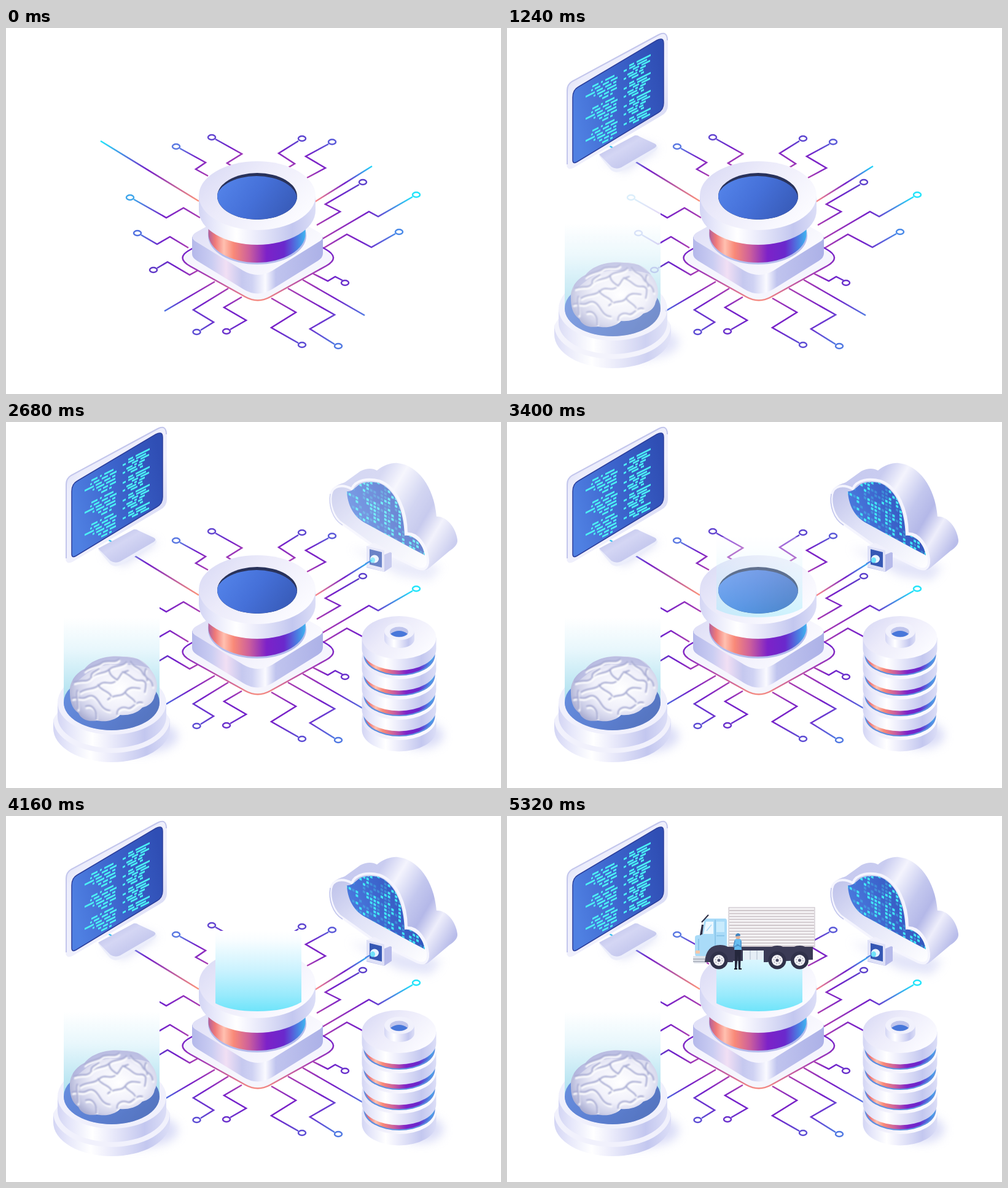
Write an HTML page that moves like this. It is 806 by 596 pixels and loops after 10000 ms.

```html
<!DOCTYPE html>
<html lang="en">
<head>
<meta charset="utf-8">
<title>Data hub</title>
<style>
html, body { margin: 0; width: 100%; height: 100%; overflow: hidden; background: #fff; }
svg { display: block; width: 806px; height: 596px; }
.layer { animation: 10s linear infinite both; }
#monitor { animation-name: monitor; }
#brain { animation-name: brain; }
#store { animation-name: store; }
#cloud { animation-name: cloud; }
#beam { animation-name: beam; }
#truck { animation-name: truck; }
@keyframes monitor { 0% { opacity: 0 } 7.2%, 100% { opacity: 1 } }
@keyframes brain { 0%, 7.2% { opacity: 0 } 13.6%, 100% { opacity: 1 } }
@keyframes store { 0%, 14% { opacity: 0 } 20%, 100% { opacity: 1 } }
@keyframes cloud { 0%, 22.4% { opacity: 0 } 28.4%, 100% { opacity: 1 } }
@keyframes beam { 0%, 30.4% { opacity: 0 } 41.6%, 100% { opacity: 1 } }
@keyframes truck { 0%, 46.8% { opacity: 0 } 53.2%, 100% { opacity: 1 } }
</style>
</head>
<body>
<svg viewBox="0 0 806 596">
<defs>
  <linearGradient id="side">
    <stop offset="0" stop-color="#d3d5f4"/><stop offset=".12" stop-color="#e6e7fa"/>
    <stop offset=".32" stop-color="#fff"/><stop offset=".45" stop-color="#f0f0fc"/>
    <stop offset=".8" stop-color="#c3c7ef"/><stop offset="1" stop-color="#dcdef7"/>
  </linearGradient>
  <linearGradient id="top" x1="0" y1="0" x2="1" y2=".6">
    <stop offset="0" stop-color="#d6d7f4"/><stop offset=".45" stop-color="#ecebfa"/><stop offset="1" stop-color="#fbfbff"/>
  </linearGradient>
  <linearGradient id="glow">
    <stop offset="0" stop-color="#b0609c"/><stop offset=".07" stop-color="#f07a78"/>
    <stop offset=".16" stop-color="#ffc0b0"/><stop offset=".26" stop-color="#f98a78"/>
    <stop offset=".42" stop-color="#cc5f9c"/><stop offset=".6" stop-color="#7d22c8"/>
    <stop offset=".78" stop-color="#6a28cc"/><stop offset=".92" stop-color="#4a80e2"/><stop offset="1" stop-color="#3fb4f0"/>
  </linearGradient>
  <linearGradient id="disc" x1="0" y1=".2" x2="1" y2=".6">
    <stop offset="0" stop-color="#5484ea"/><stop offset=".5" stop-color="#4570d8"/><stop offset="1" stop-color="#385bb8"/>
  </linearGradient>
  <linearGradient id="block" gradientUnits="userSpaceOnUse" x1="303" y1="0" x2="516" y2="0">
    <stop offset="0" stop-color="#b4b8ea"/><stop offset=".15" stop-color="#cacdf2"/>
    <stop offset=".26" stop-color="#f1dff4"/><stop offset=".38" stop-color="#c5c8ef"/>
    <stop offset=".46" stop-color="#cfd2f3"/><stop offset=".56" stop-color="#fafaff"/>
    <stop offset=".64" stop-color="#c0c4ee"/><stop offset="1" stop-color="#acb1e7"/>
  </linearGradient>
  <linearGradient id="rim" gradientUnits="userSpaceOnUse" x1="0" y1="365" x2="0" y2="444">
    <stop offset="0" stop-color="#7420c8"/><stop offset=".45" stop-color="#a63cb4"/><stop offset="1" stop-color="#f58a80"/>
  </linearGradient>
  <linearGradient id="beamFill" x1="0" y1="0" x2="0" y2="1">
    <stop offset="0" stop-color="#fff"/><stop offset=".12" stop-color="#f8fdff"/>
    <stop offset=".5" stop-color="#c9f2fe"/><stop offset=".8" stop-color="#98eafc"/><stop offset="1" stop-color="#6ee4fa"/>
  </linearGradient>
  <linearGradient id="mist" x1="0" y1="0" x2="0" y2="1">
    <stop offset="0" stop-color="#fff"/><stop offset=".28" stop-color="#fff"/>
    <stop offset=".55" stop-color="#e8f7fc"/><stop offset="1" stop-color="#a9dfee"/>
  </linearGradient>
  <linearGradient id="frame" x1="0" y1="0" x2="1" y2="1">
    <stop offset="0" stop-color="#c8cbf0"/><stop offset=".25" stop-color="#ecedfb"/>
    <stop offset=".6" stop-color="#f0f0fc"/><stop offset="1" stop-color="#c2c6ee"/>
  </linearGradient>
  <linearGradient id="screen" x1="0" y1=".6" x2="1" y2=".3">
    <stop offset="0" stop-color="#4f80e2"/><stop offset=".5" stop-color="#3c64cc"/><stop offset="1" stop-color="#2f4eb4"/>
  </linearGradient>
  <linearGradient id="foot" x1=".1" y1="0" x2=".9" y2=".8">
    <stop offset="0" stop-color="#b4b8e6"/><stop offset=".45" stop-color="#d4d6f4"/><stop offset="1" stop-color="#bcc0ea"/>
  </linearGradient>
  <radialGradient id="cortex" cx=".56" cy=".5" r=".58">
    <stop offset="0" stop-color="#fff"/><stop offset=".5" stop-color="#f0f0fa"/>
    <stop offset=".8" stop-color="#cdcfe8"/><stop offset="1" stop-color="#a4a8ce"/>
  </radialGradient>
  <linearGradient id="hull" x1="0" y1=".2" x2="1" y2=".7">
    <stop offset="0" stop-color="#c6c9ef"/><stop offset=".28" stop-color="#c9ccf0"/>
    <stop offset=".42" stop-color="#f4f4fd"/><stop offset=".6" stop-color="#c3c7ee"/>
    <stop offset=".72" stop-color="#b4b8e8"/><stop offset=".84" stop-color="#eeeefb"/><stop offset="1" stop-color="#b9bdea"/>
  </linearGradient>
  <linearGradient id="wall" x1="0" y1="0" x2="1" y2="1">
    <stop offset="0" stop-color="#b9bde8"/><stop offset=".4" stop-color="#e0e2f7"/><stop offset="1" stop-color="#fff"/>
  </linearGradient>
  <filter id="soft" x="-30%" y="-50%" width="160%" height="200%"><feGaussianBlur stdDeviation="8"/></filter>
  <filter id="fuzz"><feGaussianBlur stdDeviation=".8"/></filter>
  <clipPath id="well"><ellipse cx="409" cy="274" rx="65" ry="38"/></clipPath>
  <clipPath id="pane"><path d="M555 113C566 114 570 103 579 100C590 97 602 97 611 101C634 112 648 145 649 185C663 183 679 197 682 217L663 207L584 164C566 154 556 135 555 113Z"/></clipPath>
  <clipPath id="lobes"><path d="M104 440C103 422 115 408 128 402C140 386 168 379 190 382C212 381 228 390 236 404C246 416 249 432 242 446C240 458 230 463 222 465C212 476 196 478 186 477C176 487 160 489 148 486C134 489 122 484 118 474C106 466 104 452 104 440Z"/></clipPath>
</defs>

<g id="wires" fill="none" stroke-width="2.5" stroke-linejoin="miter"></g>

<g id="hub">
  <path d="M300 361Q275 374 300 388L390 438Q410 449 430 438L522 387Q545 374 520 360L410 300Z" fill="#f5f5fd" stroke="url(#rim)" stroke-width="2.5"/>
  <path d="M303 340V368Q303 374 311 379L386 425Q410 440 434 425L508 379Q516 374 516 367V340L410 300Z" fill="url(#block)"/>
  <path d="M309 333Q297 341 311 349L386 395Q410 409 434 395L508 349Q522 341 510 333L434 290Q410 277 386 290Z" fill="url(#top)"/>
  <ellipse cx="409" cy="338" rx="80" ry="47" fill="#b3bbec"/>
  <path d="M329.500 300V335A79 47 0 0 0 487.500 335V300Z" fill="url(#glow)"/>
  <path d="M314 273V297A95 56 0 0 0 504 297V273Z" fill="url(#side)"/>
  <ellipse cx="409" cy="273" rx="95" ry="56" fill="url(#top)"/>
  <g clip-path="url(#well)">
    <rect x="340" y="230" width="140" height="90" fill="#29325a"/>
    <ellipse cx="408" cy="279" rx="66" ry="38" fill="url(#disc)"/>
  </g>
</g>

<g id="monitor" class="layer">
  <path d="M158 214L215 184L248 196L190 234Z" fill="#b9bdea" opacity=".5" filter="url(#soft)"/>
  <path d="M150 208L208 175Q212 174 216 177L241 189Q248 193 243 199L188 232Q178 238 169 231Z" fill="#eceefb"/>
  <path d="M150 206L208 175Q212 174 216 177L240 188Q246 191 241 195L186 227Q178 231 170 226Z" fill="url(#foot)"/>
  <path d="M97 101Q97 91 106 86L246 10Q262 3 262 20V126Q262 137 251 143L108 228Q97 233 97 221Z" fill="url(#frame)"/>
  <path d="M98 222V102Q98 92 106 87L247 11Q261 4 261 20" fill="none" stroke="#c3c6ec" stroke-width="2"/>
  <path d="M107 113Q107 101 116 96L244 20Q255 14 255 25V122Q255 133 246 138L114 218Q107 222 107 215Z" fill="url(#screen)" stroke="#2c3f9c" stroke-width="1.500"/>
  <g id="code" fill="#4cf0f4"></g>
</g>

<g id="brain" class="layer">
  <ellipse cx="214" cy="512" rx="66" ry="28" fill="#bcc0f0" opacity=".55" filter="url(#soft)"/>
  <rect x="94" y="265" width="156" height="192" fill="url(#mist)"/>
  <path d="M77 484V499A95 55 0 0 0 267 499V484Z" fill="url(#side)"/>
  <path d="M77 484A95 55 0 0 0 267 484L250 457H94Z" fill="#f1f1fc"/>
  <path d="M84 457V480A88.500 51 0 0 0 261 480V457Z" fill="url(#side)"/>
  <path d="M84 457A88.500 52 0 0 0 261 457Q261 444 250 432V457H94V432Q84 444 84 457Z" fill="#f0f0fc"/>
  <path d="M94 457A78 45 0 0 0 250 457Q250 443 238 432H106Q94 443 94 457Z" fill="url(#disc)"/>
  <path d="M94 457A78 45 0 0 0 250 457Q250 443 238 432H106Q94 443 94 457Z" fill="#7f98c8" opacity=".4"/>
  <g clip-path="url(#lobes)">
    <rect x="100" y="376" width="150" height="116" fill="url(#cortex)"/>
    <path d="M110 410C130 385 170 376 215 386L236 402C210 392 190 398 170 395C150 396 130 408 108 430Z" fill="#a9addc" opacity=".55"/>
    <g id="folds" fill="none" stroke-linecap="round" filter="url(#fuzz)"></g>
  </g>
</g>

<g id="store" class="layer">
  <ellipse cx="676" cy="510" rx="36" ry="22" fill="#bcc0f0" opacity=".55" filter="url(#soft)"/>
  <g id="stack"></g>
  <path d="M616 341V354A24.500 14 0 0 0 665 354V341Z" fill="url(#side)"/>
  <ellipse cx="640.500" cy="341" rx="24.500" ry="14" fill="#f1f1fc"/>
  <ellipse cx="640" cy="342" rx="15" ry="8.500" fill="#c0c5ec"/>
  <path d="M626 345Q640 335 654 345Q649 350 640 350Q631 350 626 345Z" fill="#4877da"/>
</g>

<g id="cloud" class="layer">
  <path d="M560 205L650 225L710 235L690 258L640 250Z" fill="#c4c8f2" opacity=".5" filter="url(#soft)"/>
  <path d="M548 167C532 157 525 135 528 117C531 104 543 102 552 98L577 80C587 75 597 75 604 79C615 70 628 66 638 67C670 70 697 105 701 154C718 153 733 173 735 192C736 200 728 206 722 210L690 237C684 243 676 242 666 237L600 204Z" fill="url(#hull)"/>
  <path d="M548 166C533 156 526 135 529 118C532 103 548 101 563 109C569 94 590 91 608 96C636 106 652 143 652 182C669 180 685 200 687 224C688 240 679 243 666 236L600 203Z" fill="url(#wall)" stroke="#f5f5fe" stroke-width="4" stroke-linejoin="round"/>
  <path d="M548 168C531 158 525 135 528 117" fill="none" stroke="#bfc3ec" stroke-width="1.500"/>
  <g clip-path="url(#pane)">
    <rect x="550" y="94" width="136" height="128" fill="url(#screen)"/>
    <g id="cells" fill="#43ecf6"></g>
  </g>
  <path d="M587 202L615 208L628 213V236L616 244L587 237Z" fill="#b6baea"/>
  <path d="M587 202L600 197L628 211L616 216Z" fill="#f0f0fc"/>
  <path d="M587 202L616 209V244L587 236Z" fill="#dfe1f7"/>
  <path d="M592 207L612 212V237L592 232Z" fill="#3557b4"/>
  <path d="M585 231L596 225" stroke="#4a86e6" stroke-width="2.500"/>
  <ellipse cx="600" cy="223" rx="7" ry="6.500" fill="#e8f4ff"/>
  <ellipse cx="597" cy="225" rx="4" ry="4.500" fill="#6fe2f8"/>
</g>

<g id="beam" class="layer">
  <path d="M341 187H481V303Q456 318 409 318Q366 318 341 305Z" fill="url(#beamFill)"/>
</g>

<g id="truck" class="layer">
  <rect x="361" y="149" width="140" height="64" fill="#f4f2f4" stroke="#c4bcc4"/>
  <path id="slats" stroke="#c3b9bf" stroke-width="1.300"/>
  <path d="M357 213H498V234H484L478 222H436L424 238H418V219H384V236H357Z" fill="#3b3b56"/>
  <rect x="386" y="219" width="31" height="15" rx="2" fill="#e6eef6"/>
  <path d="M396 219V234M407 219V234" stroke="#aebccc"/>
  <path d="M324 167H355Q358 167 358 171V228H308Q306 228 306 222V198Q306 194 311 194L318 193L321 170Q321 167 324 167Z" fill="#a9dbf8"/>
  <path d="M324 172H336V192H320Z" fill="#edf8ff"/>
  <path d="M341 172H354V189H341Z" fill="#c9ebfd"/>
  <path d="M339 169V220M341 195H354M312 200V222" stroke="#6fb2dc" fill="none"/>
  <path d="M325 187L333 177" stroke="#a9dbf8" stroke-width="1.500"/>
  <path d="M317 173L328 161M318 177L315 194M319 177L317 193" stroke="#2f3048" stroke-width="2" fill="none"/>
  <path d="M303 228H325V240H306Q303 240 303 236Z" fill="#dfe3ea"/>
  <path d="M303 233H323M303 237H322" stroke="#858c9c"/>
  <rect x="307" y="219" width="7" height="5" fill="#f4c7a8"/>
  <path d="M322 238Q324 210 347 210Q362 210 368 222V238Z" fill="#3b3b56"/>
  <path d="M418 238Q422 211 440 211Q451 211 458 220Q466 211 477 211Q494 212 498 234Z" fill="#3b3b56"/>
  <g id="wheels"></g>
  <g id="driver">
    <path d="M371 218H381L380 249H377L376 226L374 249H371Z" fill="#25273c"/>
    <path d="M370 248H375V250H370ZM377 248H382V250H377Z" fill="#191a28"/>
    <path d="M371 201Q376 198 381 201L382 218H370Z" fill="#66bdf0"/>
    <path d="M371 203L369 213L378 210M381 203L381 213L374 209" stroke="#4a8fc8" stroke-width="1.500" fill="none"/>
    <circle cx="376" cy="197" r="3.500" fill="#e2b199"/>
    <path d="M372 196Q372 191 377 191Q380 192 380 195Z" fill="#3f84c0"/>
  </g>
</g>
</svg>

<script>
const $ = id => document.getElementById(id);
const add = (id, html) => $(id).insertAdjacentHTML('beforeend', html);

// Circuit traces: outer colour, ring centre, then the bends towards the hub
const traces = [
  ['#6244d0', 335, 178, '341 181 384 205 360 220 368 225'],
  ['#5a78e2', 277, 193, '283 196 325 219 309 230 329 241'],
  ['#3fa6ea', 202, 276, '208 279 261 309 289 293 316 309'],
  ['#5070e0', 214, 334, '220 337 246 352 267 340 297 358'],
  ['#6038c8', 240, 394, '246 391 263 381 299 402 312 395'],
  ['#5d4cd4', 310.500, 495, '317 492 338 479 305 459 362 424'],
  ['#6a30cc', 359, 494, '365 491 391 476 355 455 384 438'],
  ['#5d4cd4', 482, 516, '476 513 432 488 472 463 432 440'],
  ['#5078e2', 541, 518, '535 515 495 490 535 467 459 424'],
  ['#6a30cc', 552, 415, '548 411 536 405 524 412 500 400'],
  ['#4a8ae8', 640, 332, '634 335 595 357 555 336 516 359'],
  ['#22e4fa', 668, 271.500, '662 275 606 307 591 299 514 344'],
  ['#5c40cc', 581, 251, '575 255 520 287 544 299 506 321'],
  ['#5a58d8', 531, 185.500, '525 189 488 209 520 228 490 244'],
  ['#5c44d0', 482, 180, '476 184 444 204 470 221 460 227'],
  ['#20e8fa', 0, 0, '154 184 314 282', '#ff9478'],
  ['#20d8fa', 0, 0, '596 225 503 283', '#ff8c88'],
  ['#4a70e2', 0, 0, '258 461 340 413'],
  ['#5078e2', 0, 0, '584 468 483 410']
];
traces.forEach(([tip, x, y, pts, root = '#ac3eb0'], i) => {
  const p = pts.split(' '), [ex, ey] = p.slice(-2);
  add('wires', `<linearGradient id="w${i}" gradientUnits="userSpaceOnUse" x1="${p[0]}" y1="${p[1]}" x2="${ex}" y2="${ey}">
    <stop offset="0" stop-color="${tip}"/><stop offset=".48" stop-color="#741fca"/><stop offset="1" stop-color="${root}"/></linearGradient>
    <polyline points="${pts}" stroke="url(#w${i})"/>`);
  if (x) add('wires', `<ellipse cx="${x}" cy="${y}" rx="6" ry="4" fill="#fff" stroke="${tip}"/>`);
});

// Code on the monitor: start and end of each dash, row by row
const leftRows = ['139 149 153 156 160 175', '137 140 143 152 156 166 169 180', '128 143 146 156 160 170 173 178',
  '141 144 147 160 163 178', '150 155 158 166 169 179', '155 165 168 172'];
const rightRows = ['199 207 211 234', '190 195 199 209 212 228', '205 215 219 233',
  '196 206 209 213 217 226', '190 194 198 212 215 222', '203 214 218 223'];
function dashes(rows, x0, y0, period, count) {
  for (let n = 0; n < count; n++) {
    const s = rows[n % 6].split(' '), y = y0 + Math.floor(n / 6) * period + n % 6 * period / 6.600;
    let bars = '';
    for (let i = 0; i < s.length; i += 2)
      bars += `<rect x="${s[i] - x0}" y="-1.500" width="${s[i + 1] - s[i]}" height="3"/>`;
    add('code', `<g transform="matrix(1 -.5 0 1 ${x0} ${y})">${bars}</g>`);
  }
}
dashes(leftRows, 128, 101, 36, 18);
dashes(rightRows, 190, 66, 29, 21);

// Brain grooves with a pale edge beside each
const folds = [
  'M128 405C136 397 150 398 156 392S178 394 184 386',
  'M111 424C124 419 132 425 139 416S160 411 168 403S188 400 196 391',
  'M121 440C132 432 143 437 152 428S171 431 181 420S183 410 199 405',
  'M108 450C117 446 122 453 131 448S145 447 150 454S158 469 169 470',
  'M166 452C176 442 188 449 194 440S207 432 218 434',
  'M203 390C207 401 218 398 222 408S237 417 239 430',
  'M190 407C204 412 207 422 218 421S229 428 226 440',
  'M150 428C154 438 168 438 171 446',
  'M130 463C141 459 148 470 147 484',
  'M181 476C180 466 190 463 198 466S211 453 222 457',
  'M194 440C198 448 207 449 210 456',
  'M139 416C137 408 146 406 151 402',
  'M116 437C113 447 118 455 117 467',
  'M168 403C168 412 175 416 181 420',
  'M228 402C222 412 231 416 230 421'
];
folds.forEach(d => add('folds', `<path d="${d}" stroke="#fff" stroke-width="3" transform="translate(1 3)"/>
  <path d="${d}" stroke="#a5a9d2" stroke-width="2.600"/>`));

// Database discs, lowest first
for (let i = 4; i >= 0; i--) {
  const y = 351 + 33 * i;
  if (i < 4) add('stack', `<ellipse cx="640.500" cy="${y + 29}" rx="58" ry="33" fill="#5d8fe0"/>
    <path d="M584 ${y + 14}V${y + 27}A56.500 33 0 0 0 697 ${y + 27}V${y + 14}Z" fill="url(#glow)"/>`);
  add('stack', `<path d="M579.500 ${y}V${y + 18.500}A60.500 35 0 0 0 700.500 ${y + 18.500}V${y}Z" fill="url(#side)"/>
    <ellipse cx="640" cy="${y}" rx="60.500" ry="35" fill="url(#top)"/>`);
}

// Cloud cells
let seed = 7;
const rnd = () => (seed = seed * 16807 % 2147483647) / 2147483647;
let cells = '';
for (let x = 552; x < 686; x += 5.800)
  for (let k = 0; k < 24; k++) {
    const r = rnd(), y = 64 + k * 6 + (x - 552) * .5;
    if (r > .4) cells += `<path d="M${x} ${y}l4 2v4l-4-2z" opacity="${r > .68 ? .95 : .3}"/>`;
  }
add('cells', cells);

// Truck slats and wheels
let slats = '';
for (let y = 154; y < 212; y += 4.800) slats += `M362 ${y}H500`;
$('slats').setAttribute('d', slats);
for (const x of [345, 440, 476.500])
  add('wheels', `<circle cx="${x}" cy="235" r="14.500" fill="#30314a"/><circle cx="${x}" cy="235" r="9" fill="#f1f1f5"/>
    <circle cx="${x}" cy="235" r="5.500" fill="none" stroke="#9a9cac" stroke-width="1.500" stroke-dasharray="1.500 2.800"/>
    <circle cx="${x}" cy="235" r="2.500" fill="#4a4c66"/>`);
</script>
</body>
</html>
```
